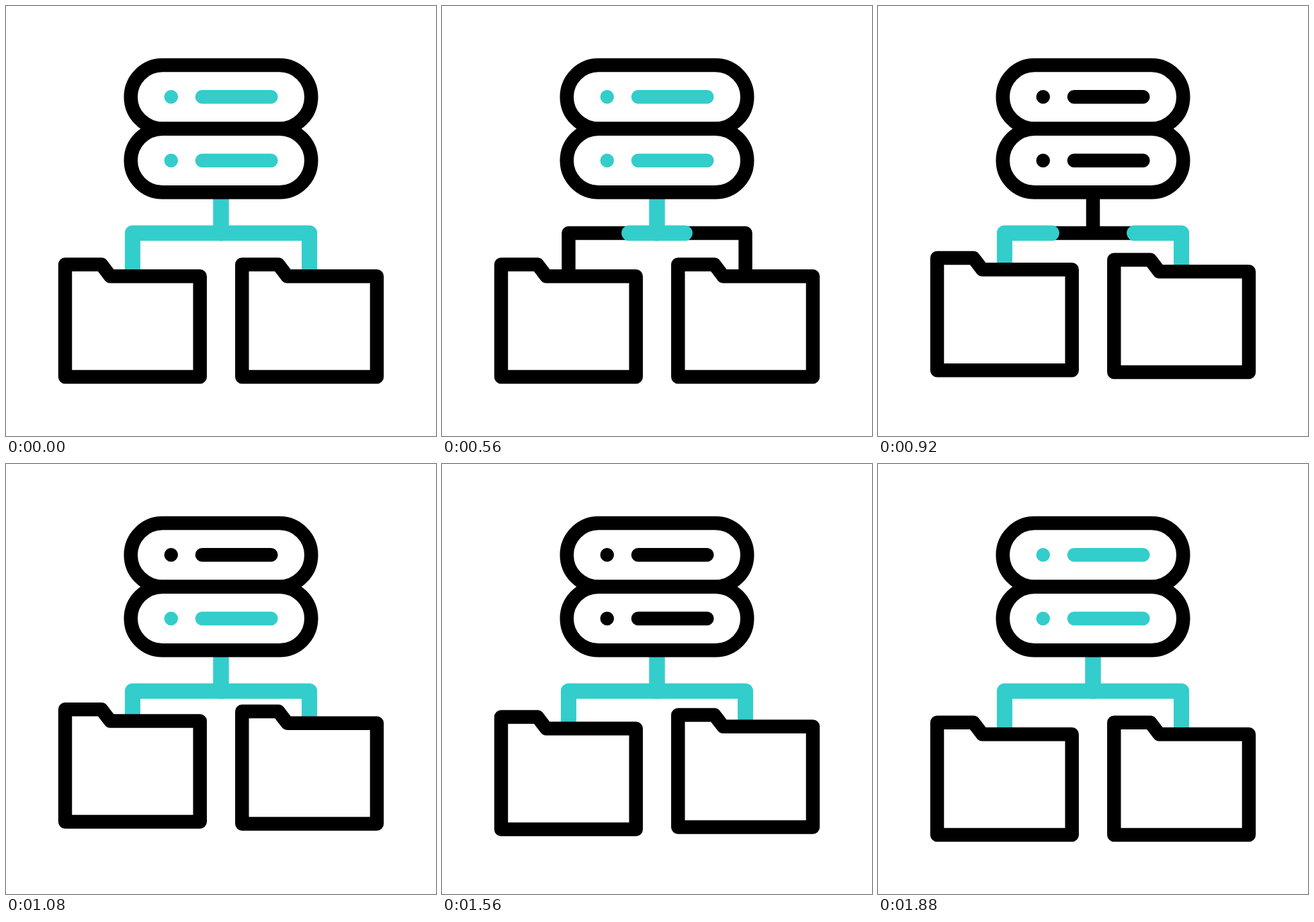
These frames come from a looping animation (640x640 px, 2 s). An HTML page:

```html
<!DOCTYPE html>
<html lang="en">
<head>
<meta charset="utf-8">
<title>Server and folders</title>
<style>
  html, body { margin: 0; width: 100%; height: 100%; overflow: hidden; background: #fff; }
  svg { display: block; width: 100%; height: 100%; }
  path, rect { fill: none; stroke: #000; stroke-width: 20.5; stroke-linecap: round; stroke-linejoin: round; }
  .flow path { stroke: #33cdcc; stroke-width: 23; }
  .solid { fill: #fff; }
  .lights path { stroke: inherit; }
</style>
</head>
<body>
<svg viewBox="0 0 640 640">
  <path d="M188.4 402V338H451.6V402M320 338V277.3"/>
  <g class="flow" id="retract">
    <path d="M188.4 402V338H320V277.3"/>
    <path d="M451.6 402V338H320V277.3"/>
  </g>
  <g class="flow" id="grow">
    <path d="M188.4 402V338H320V277.3"/>
    <path d="M451.6 402V338H320V277.3"/>
  </g>
  <rect class="solid" x="185.7" y="88.1" width="268.6" height="94.6" rx="47.3"/>
  <rect class="solid" x="185.7" y="182.7" width="268.6" height="94.6" rx="47.3"/>
  <g class="lights" id="upper"><path d="M245.7 135.2h.01M291.9 135.2H394.4"/></g>
  <g class="lights" id="lower"><path d="M245.7 230h.01M291.9 230H394.4"/></g>
  <path class="solid" id="left" d="M88 384.8H142L155.3 402.2H288.7V552H88Z"/>
  <path class="solid" id="right" d="M351.3 384.8H405.3L418.6 402.2H552V552H351.3Z"/>
</svg>
<script>
const LOOP = 2000, LIFT = 22.9, LENGTH = 64 + 131.6 + 60.7;
const byId = id => document.getElementById(id);
const progress = (t, from, to) => Math.min(1, Math.max(0, (t - from) / (to - from)));
const smooth = s => s * s * (3 - 2 * s);

// Shows the part of each branch between two distances from its folder.
function showFlow(id, from, to) {
  const group = byId(id);
  group.style.display = to > from ? '' : 'none';
  group.style.strokeDasharray = `${to - from} 999`;
  group.style.strokeDashoffset = -from;
}

function moveFolder(id, t, up, down) {
  const height = LIFT * (smooth(progress(t, ...up)) - smooth(progress(t, ...down)));
  byId(id).setAttribute('transform', `translate(0 ${-height})`);
}

// Two dark blinks, each as long as the bright gap between them.
function blink(id, t, start) {
  const phase = Math.floor((t - start) / 360);
  byId(id).style.stroke = phase === 0 || phase === 2 ? '#000' : '#33cdcc';
}

function draw(now) {
  const t = now % LOOP;
  showFlow('retract', LENGTH * progress(t, 200, 800), LENGTH);
  showFlow('grow', 0, LENGTH * progress(t, 725, 1100));
  moveFolder('left', t, [685, 1205], [1280, 1755]);
  moveFolder('right', t, [715, 1275], [1320, 1800]);
  blink('lower', t, 720);
  blink('upper', t, 800);
  requestAnimationFrame(draw);
}
draw(performance.now());
</script>
</body>
</html>
```
